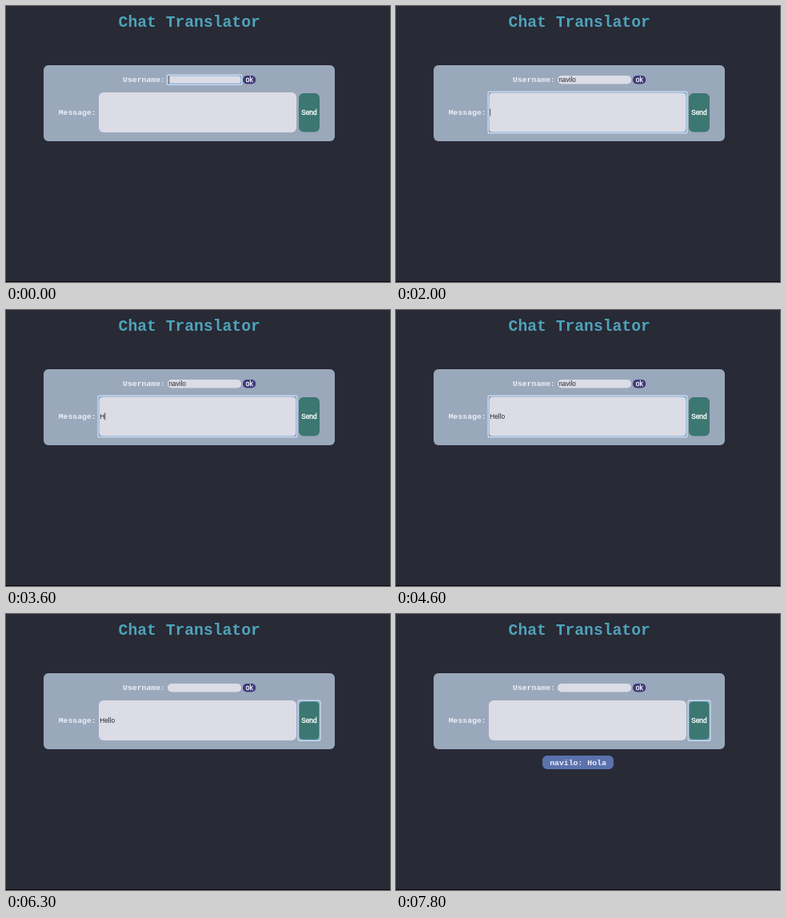
An HTML page that plays this animation: 480x345 px, repeating every 8000 ms.

```html
<!DOCTYPE html>
<html lang="en">
<head>
<meta charset="utf-8">
<title>Chat Translator</title>
<style>
  html, body { margin: 0; width: 100%; height: 100%; overflow: hidden; background: #282a36; }
  svg { display: block; width: 480px; height: 345px; }
  .mono { font: bold 9.8px "Liberation Mono", monospace; fill: #eceff5; }
  .title { font-size: 19.7px; fill: #4fa3ba; }
  .sans { font: 8.3px "Liberation Sans", sans-serif; fill: #24252f; }
  .button { fill: #fff; stroke: #fff; stroke-width: .35px; text-anchor: middle; }
  .middle { text-anchor: middle; }
  .field { fill: #dcdce6; }
  .outer { fill: none; stroke: #d0e1f3; stroke-width: 1.2px; }
  .inner { fill: none; stroke: #7ba5d0; stroke-width: 1.2px; }
  .caret { fill: #30323e; }
</style>
</head>
<body>
<svg viewBox="0 0 480 345">
  <rect width="480" height="345" fill="#282a36"/>
  <rect y="344" width="480" height="1" fill="#08080c"/>
  <text class="mono title middle" x="229.2" y="26">Chat Translator</text>
  <rect x="47" y="74" width="364" height="95" rx="6" fill="#9aa8bc"/>

  <text class="mono" x="146" y="95">Username:</text>
  <rect class="field" x="202" y="87" width="92" height="10.4" rx="5"/>
  <text class="sans" id="userText" x="203.2" y="95"/>

  <rect id="okButton" x="296" y="87" width="16.2" height="10.4" rx="5" fill="#3f3c7b"/>
  <text class="sans button" x="304.2" y="95">ok</text>

  <text class="mono" x="65.7" y="136">Message:</text>
  <rect class="field" x="116" y="108" width="247" height="50" rx="6"/>
  <text class="sans" id="messageText" x="117.2" y="136"/>

  <rect x="366" y="109" width="26" height="48.4" rx="6" fill="#3c7772"/>
  <text class="sans button" x="378.9" y="136">Send</text>

  <g id="rings"></g>
  <rect class="caret" id="userCaret" y="87.8" width=".8" height="9"/>
  <rect class="caret" id="messageCaret" y="128.5" width=".8" height="9"/>

  <g id="reply">
    <rect x="183" y="177" width="89" height="17" rx="6" fill="#5b72ae"/>
    <text class="mono middle" x="227.5" y="188.6">navilo: Hola</text>
  </g>
</svg>
<script>
  const LOOP = 8000;
  const BLINK = 500;
  const $ = id => document.getElementById(id);

  const user = {
    word: 'navilo', keys: [700, 800, 1000, 1100, 1200, 1300],
    text: $('userText'), caret: $('userCaret'), focus: 0, blur: 2000, clear: 5800
  };
  const message = {
    word: 'Hello', keys: [3500, 3700, 3800, 3900, 4100],
    text: $('messageText'), caret: $('messageCaret'), focus: 2000, blur: 5400, clear: 7000
  };

  function addRing(x, y, w, h, innerRadius, from, to) {
    const rect = (name, inset, radius) =>
      `<rect class="${name}" x="${x + inset}" y="${y + inset}" width="${w - 2 * inset}" height="${h - 2 * inset}" rx="${radius}"/>`;
    $('rings').insertAdjacentHTML('beforeend',
      `<g>${rect('inner', 0, innerRadius)}${rect('outer', -.9, 2)}</g>`);
    return { node: $('rings').lastElementChild, from, to };
  }

  const rings = [
    addRing(202, 87, 92, 10.4, 2, user.focus, user.blur),
    addRing(116, 108, 247, 50, 4, message.focus, message.blur),
    addRing(296, 87, 16.2, 10.4, 3, 5400, 6300),
    addRing(366, 109, 26, 48.4, 5, 6300, LOOP)
  ];

  const show = (node, on) => node.setAttribute('visibility', on ? 'visible' : 'hidden');

  function drawField(field, t) {
    const pressed = field.keys.filter(key => key <= t);
    const value = t < field.clear ? field.word.slice(0, pressed.length) : '';
    if (field.text.textContent !== value) field.text.textContent = value;

    // Every key press restarts the caret's blink.
    const restart = pressed.length ? pressed[pressed.length - 1] : field.focus;
    const focused = t >= field.focus && t < field.blur;
    show(field.caret, focused && Math.floor((t - restart) / BLINK) % 2 === 0);
    const width = value ? field.text.getComputedTextLength() : 0;
    field.caret.setAttribute('x', +field.text.getAttribute('x') + width + .2);
  }

  function draw(now) {
    const t = now % LOOP;
    drawField(user, t);
    drawField(message, t);
    rings.forEach(ring => show(ring.node, t >= ring.from && t < ring.to));
    $('okButton').setAttribute('fill', t >= 5400 && t < 6300 ? '#333f83' : '#3f3c7b');
    show($('reply'), t >= message.clear);
  }

  const start = performance.now();
  function tick() {
    draw(performance.now() - start);
    requestAnimationFrame(tick);
  }
  tick();
</script>
</body>
</html>
```
